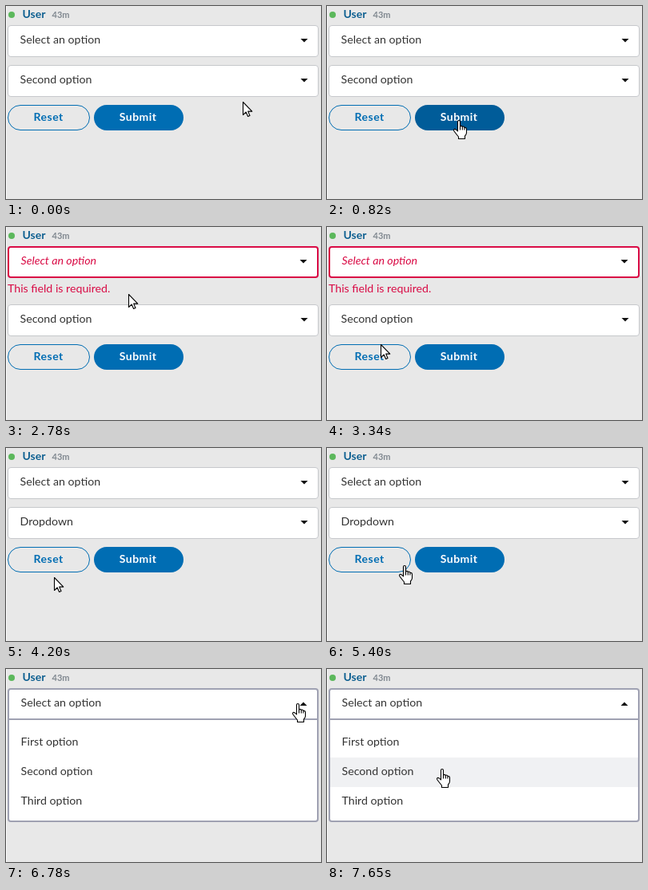
Recreate the animation shown at these times as an HTML page with a canvas. Size 394 by 242 pixels, loop 8000 ms.

```html
<!DOCTYPE html>
<html lang="en">
<head>
<meta charset="utf-8">
<title>Dropdown form</title>
<style>
  html, body { margin: 0; width: 100%; height: 100%; overflow: hidden; background: #e8e8e8; }
  canvas { display: block; width: 100vw; height: 100vh; }
</style>
</head>
<body>
<canvas id="stage"></canvas>
<script>
const W = 394, H = 242, LOOP = 8000;
const SUBMIT_AT = 1630, RESET_AT = 4170, OPEN_AT = 6780;
const SHIFT = 23;         // room taken by the error message
const CURSOR_LAG = 30;    // cursor shape follows a layout change a little late
const FONT = 'Lato, "Open Sans", sans-serif';
const INK = '#333333', RED = '#d90b45', BLUE = '#006db3', FOCUS = '#9fa1b2';

const canvas = document.getElementById('stage');
const ctx = canvas.getContext('2d');
const dpr = window.devicePixelRatio || 1;
canvas.width = Math.round(W * dpr);
canvas.height = Math.round(H * dpr);

// Pointer hot spot: time, x, y
const TRACK = [
  [0, 296, 120], [20, 296, 120], [420, 236, 98], [820, 164, 143],
  [2550, 164, 143], [2780, 153, 84], [2950, 128, 58], [3340, 67, 147],
  [3380, 61, 157], [3520, 61, 157], [3550, 60, 162],
  [5240, 60, 162], [5890, 323, 54], [6030, 335, 51],
  [6100, 335, 51], [6410, 364, 43],
  [7110, 364, 43], [7650, 143, 125], [LOOP, 143, 125]
];

function secant(i, axis) {
  const a = TRACK[i], b = TRACK[i + 1];
  return a && b ? (b[axis] - a[axis]) / (b[0] - a[0]) : 0;
}

// Harmonic mean keeps the curve from overshooting its points
function slope(i, axis) {
  const p = secant(i - 1, axis), q = secant(i, axis);
  return p * q > 0 ? 2 * p * q / (p + q) : 0;
}

function pointerAt(t) {
  let i = 0;
  while (i < TRACK.length - 2 && t >= TRACK[i + 1][0]) i++;
  const a = TRACK[i], b = TRACK[i + 1], d = b[0] - a[0], u = (t - a[0]) / d;
  const h = u * u * (3 - 2 * u);
  const along = axis => a[axis] + (b[axis] - a[axis]) * h
    + d * slope(i, axis) * u * (1 - u) * (1 - u)
    - d * slope(i + 1, axis) * u * u * (1 - u);
  return { x: Math.round(along(1)), y: Math.round(along(2)) };
}

const hasError = t => t >= SUBMIT_AT && t < RESET_AT;
const isOpen = t => t >= OPEN_AT;

function hoverAt(t, p) {
  const s = hasError(t) ? SHIFT : 0;
  const inside = (x0, y0, x1, y1) => p.x >= x0 && p.x < x1 && p.y > y0 && p.y < y1;
  if (isOpen(t)) return inside(2, 24, 391, 192) ? 'list' : '';
  if (inside(2, 24, 391, 64)) return 'first';
  if (inside(2, 74 + s, 391, 114 + s)) return 'second';
  if (inside(2, 124 + s, 105, 156 + s)) return 'reset';
  if (inside(110, 124 + s, 222, 156 + s)) return 'submit';
  return '';
}

function text(str, x, y, color, font = '14.2px', spacing = 0) {
  ctx.font = font + ' ' + FONT;
  ctx.letterSpacing = spacing + 'px';
  ctx.fillStyle = color;
  ctx.fillText(str, x, y);
}

function box(x, y, w, h, r, fill, stroke, line = 1) {
  const k = line / 2;
  ctx.beginPath();
  ctx.roundRect(x + k, y + k, w - line, h - line, Math.max(0, r - k));
  if (fill) { ctx.fillStyle = fill; ctx.fill(); }
  if (stroke) { ctx.strokeStyle = stroke; ctx.lineWidth = line; ctx.stroke(); }
}

function caret(x, y, dir) {
  ctx.beginPath();
  ctx.moveTo(x - 4.5, y - 2 * dir);
  ctx.lineTo(x + 4.5, y - 2 * dir);
  ctx.lineTo(x, y + 2.5 * dir);
  ctx.fillStyle = '#111111';
  ctx.fill();
}

function dropdown(y, label, hovered) {
  box(2, y, 389, 40, 4, '#ffffff', hovered ? FOCUS : '#c6c8cb');
  text(label, 17.5, y + 23, INK);
  caret(373, y + 19, 1);
}

function errorDropdown() {
  box(2, 24, 389, 40, 4, '#ffffff', RED, 2);
  text('Select an option', 18.5, 47, RED, 'italic 14.2px');
  caret(372, 43, 1);
  text('This field is required.', 2, 82, RED);
}

function openList(p) {
  box(2, 24, 389, 168, 4, '#ffffff', FOCUS, 2);
  ctx.fillStyle = FOCUS;
  ctx.fillRect(3, 62, 387, 2);
  text('Select an option', 18.5, 47, INK);
  caret(372, 44, -1);
  ['First option', 'Second option', 'Third option'].forEach((label, i) => {
    const top = 74 + 37 * i;
    if (p.y >= top && p.y < top + 37) {
      ctx.fillStyle = '#f0f1f3';
      ctx.fillRect(4, top, 385, 37);
    }
    text(label, 18.5, top + 22, INK);
  });
}

function submitColor(t, hover) {
  const left = t - SUBMIT_AT;
  const dark = left >= 0 && left < 140 ? 1 - left / 140 : hover === 'submit' ? 1 : 0;
  return `rgb(0, ${109 - 17 * dark}, ${179 - 26 * dark})`;
}

function buttons(y, fill) {
  box(2, y, 103, 32, 16, null, BLUE);
  text('Reset', 34.5, y + 20, BLUE, '700 14px', 0.5);
  box(110, y, 112, 32, 16, fill, null, 0);
  text('Submit', 141.7, y + 20, '#ffffff', '700 14px', 0.5);
}

const ARROW = new Path2D('M.5 .5V16.5L4.2 13L6.6 18.5L9 17.5L6.7 12.1H11.8Z');
const HAND = new Path2D('M5.5 14V2Q5.5 .5 7 .5T8.5 2V8Q10.4 6.6 11.3 8.4Q13.2 7.4 13.9 9.4'
  + 'Q16.5 9 16.5 11.5V16Q16.5 18 14.5 20V23.5H6.5V21Q4 18 1 14Q0 12 1.4 11.4Q3 11 5.5 14Z');
const KNUCKLES = new Path2D('M8.5 8V12.5M11.3 8.4V12.5M13.9 9.4V12.5');

function cursor(p, hand) {
  ctx.save();
  ctx.translate(p.x - (hand ? 6 : 0), p.y);
  const shape = hand ? HAND : ARROW;
  ctx.lineWidth = 1.1;
  ctx.lineJoin = 'round';
  ctx.fillStyle = '#ffffff';
  ctx.strokeStyle = '#000000';
  ctx.fill(shape);
  ctx.stroke(shape);
  if (hand) ctx.stroke(KNUCKLES);
  ctx.restore();
}

function draw(t) {
  const p = pointerAt(t);
  const hover = hoverAt(t, p);
  ctx.setTransform(canvas.width / W, 0, 0, canvas.height / H, 0, 0);
  ctx.fillStyle = '#e8e8e8';
  ctx.fillRect(0, 0, W, H);
  ctx.fillStyle = '#fafafa';
  ctx.fillRect(0, 0, 1, H);

  ctx.beginPath();
  ctx.arc(7, 11, 4, 0, Math.PI * 2);
  ctx.fillStyle = '#5cb85c';
  ctx.fill();
  text('User', 20.5, 15, '#0f6091', '700 14px');
  text('43m', 57.5, 15, '#808890', '700 11px');

  if (isOpen(t)) {
    openList(p);
  } else {
    const s = hasError(t) ? SHIFT : 0;
    if (s) errorDropdown();
    else dropdown(24, 'Select an option', hover === 'first');
    dropdown(74 + s, t < RESET_AT ? 'Second option' : 'Dropdown', hover === 'second');
    buttons(124 + s, submitColor(t, hover));
  }
  cursor(p, hoverAt(Math.max(0, t - CURSOR_LAG), p) !== '');
}

const start = performance.now();
function tick() {
  draw((performance.now() - start) % LOOP);
  requestAnimationFrame(tick);
}
tick();
</script>
</body>
</html>
```
